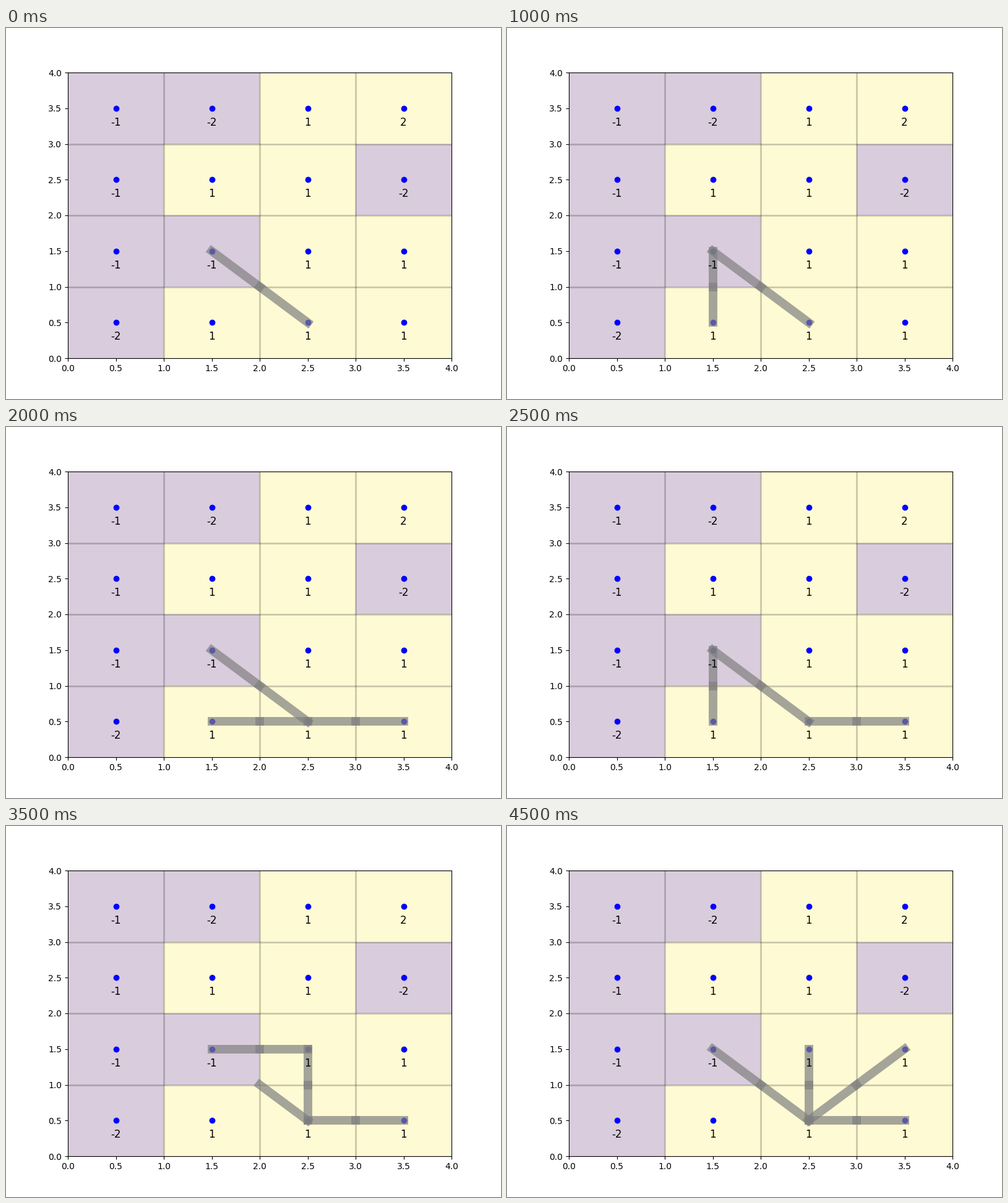
Write a matplotlib script that moves like this. It is 800 px wide and 600 px high and loops after 5 s.

```python
import matplotlib.pyplot as plt
import numpy as np
from matplotlib.animation import FuncAnimation

VALUES = np.array([[-2, 1, 1, 1],
                   [-1, -1, 1, 1],
                   [-1, 1, 1, -2],
                   [-1, -2, 1, 2]])  # bottom row first

# Links between cell centres, each drawn as two half bars.
LINKS = {
    "D": ((1.5, 1.5), (2.5, 0.5)),
    "E": ((3.5, 1.5), (2.5, 0.5)),
    "V": ((1.5, 1.5), (1.5, 0.5)),
    "U": ((2.5, 1.5), (2.5, 0.5)),
    "R": ((2.5, 0.5), (3.5, 0.5)),
    "L": ((1.5, 0.5), (2.5, 0.5)),
    "T": ((1.5, 1.5), (2.5, 1.5)),
    "d": ((2.0, 1.0), (2.5, 0.5)),  # lower half of D alone
}
STEPS = ["D", "DE", "DV", "DR", "DRL", "DRV", "DRU", "dRUT", "", "DEUR"]

fig, ax = plt.subplots(figsize=(8, 6), dpi=100)
ax.pcolormesh(np.arange(5), np.arange(5), np.sign(VALUES),
              cmap="viridis", alpha=0.2)
for k in (1, 2, 3):
    ax.axvline(k, color="k", lw=2, alpha=0.2, zorder=1)
    ax.axhline(k, color="k", lw=2, alpha=0.2, zorder=1)

for (row, col), value in np.ndenumerate(VALUES):
    centre = (col + 0.5, row + 0.5)
    ax.plot(*centre, "bo", zorder=1.5)
    ax.annotate(str(value), centre, xytext=(0, -10),
                textcoords="offset points", ha="center", va="top",
                fontsize=12)

ax.set(xlim=(0, 4), ylim=(0, 4),
       xticks=np.arange(0, 4.5, 0.5), yticks=np.arange(0, 4.5, 0.5))


def half_bar(a, b):
    return ax.plot([a[0], b[0]], [a[1], b[1]], color="gray", lw=10,
                   alpha=0.7, solid_capstyle="projecting")[0]


def make_link(key):
    a, b = LINKS[key]
    if key == "d":
        return [half_bar(a, b)]
    mid = ((a[0] + b[0]) / 2, (a[1] + b[1]) / 2)
    return [half_bar(a, mid), half_bar(b, mid)]


bars = {key: make_link(key) for key in LINKS}


def update(i):
    for key, halves in bars.items():
        for bar in halves:
            bar.set_visible(key in STEPS[i])
    return [bar for halves in bars.values() for bar in halves]


anim = FuncAnimation(fig, update, frames=len(STEPS), interval=500,
                     repeat=True, repeat_delay=0, blit=False)
plt.show()
```
